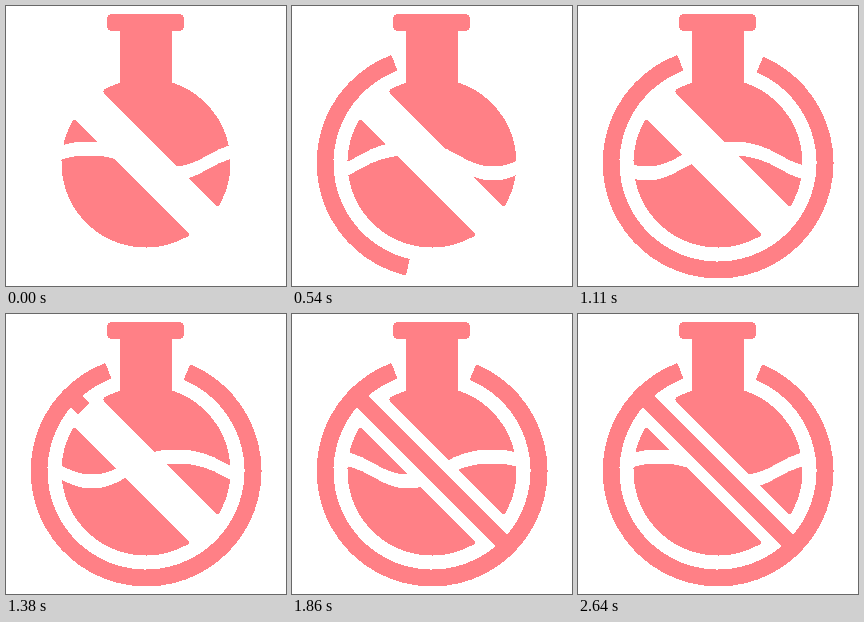
Recreate the animation shown at these times as an HTML page without scripts. Size 280 px wide and 280 px high, loop 2670 ms.

```html
<!DOCTYPE html>
<html lang="en">
<head>
<meta charset="utf-8">
<title>No chemicals</title>
<style>
  html, body { margin: 0; width: 100%; height: 100%; overflow: hidden; background: #fff; }
  svg { display: block; width: 100%; height: 100%; shape-rendering: crispEdges; }

  .ink { fill: #ff8086; }
  .soft { stroke: #ff8086; stroke-width: 4.9; stroke-linejoin: round; }
  .line { fill: none; stroke-width: 16.8; }

  .wave { fill: #fff; animation: flow 2670ms linear infinite; }
  .draw { stroke-dasharray: 1 1.1; stroke-dashoffset: 1; }
  .ring { stroke: #fff; stroke-width: 24; animation: ring 2670ms infinite; }
  .slash { stroke: #ff8086; animation: slash 2670ms infinite; }

  @keyframes flow { to { transform: translateX(168px); } }
  @keyframes ring {
    0% { stroke-dashoffset: 1; animation-timing-function: cubic-bezier(.333, 0, .667, 1); }
    42.7%, 100% { stroke-dashoffset: 0; }
  }
  @keyframes slash {
    0%, 47.19% { stroke-dashoffset: 1; animation-timing-function: cubic-bezier(.333, 0, .667, 1); }
    71.91%, 100% { stroke-dashoffset: 0; }
  }
</style>
</head>
<body>
<svg viewBox="0 0 280 280">
  <defs>
    <clipPath id="body"><circle cx="140" cy="157" r="90"/></clipPath>
    <mask id="reveal" maskUnits="userSpaceOnUse" x="0" y="0" width="280" height="280">
      <path class="line draw ring" pathLength="1" d="M102.5 56.8A107 107 0 1 0 180.9 58.1"/>
    </mask>
  </defs>

  <!-- flask -->
  <g class="ink">
    <rect x="101" y="8" width="77" height="17" rx="5"/>
    <rect x="114" y="20" width="52" height="64"/>
    <g class="soft" transform="translate(140 157) rotate(45)">
      <path d="M-79-22A82 82 0 0 1 79-22Z"/>
      <path d="M-79 22A82 82 0 0 0 79 22Z"/>
    </g>
  </g>

  <!-- liquid surface: a band of even height with broad crests -->
  <g clip-path="url(#body)">
    <path class="wave" d="M-253 135.5c46 0 52 25 84 25s38-25 84-25 52 25 84 25 38-25 84-25 52 25 84 25 38-25 84-25
      v14c-46 0-52 25-84 25s-38-25-84-25-52 25-84 25-38-25-84-25-52 25-84 25-38-25-84-25z"/>
  </g>

  <!-- prohibition sign -->
  <g mask="url(#reveal)">
    <path class="ink soft" d="M98.6 51.9A113 113 0 1 0 185.2 53.4L180.4 64.4A101 101 0 1 1 103 63Z"/>
  </g>
  <path class="line draw slash" pathLength="1" transform="translate(140 157) rotate(45)" d="M-107 0H107"/>
</svg>
</body>
</html>
```
